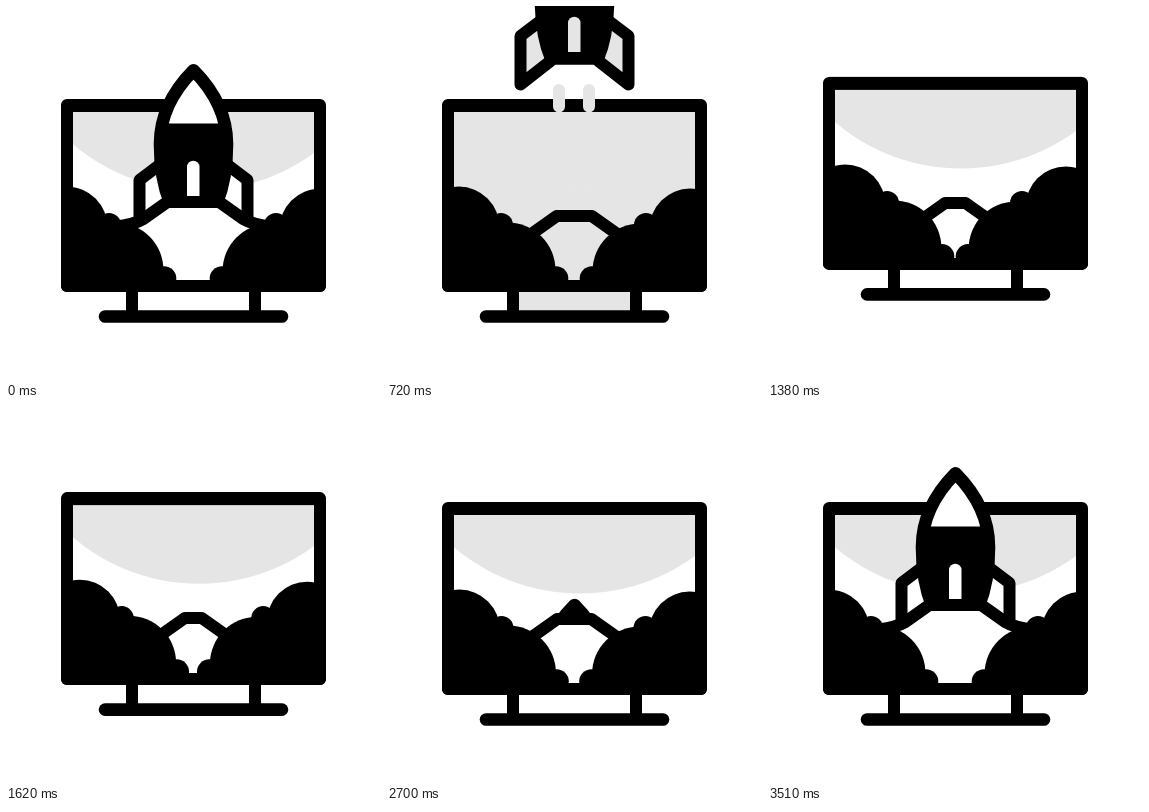
An HTML page that plays this animation: 375x375 px, repeating every 3600 ms.

```html
<!DOCTYPE html>
<html lang="en">
<head>
<meta charset="utf-8">
<title>Rocket launch</title>
<style>
  html, body { margin: 0; width: 100%; height: 100%; overflow: hidden; background: #fff; }
  svg { display: block; width: 100vw; height: 100vh; --paper: #fff; }
  .line { fill: none; stroke: #000; stroke-width: 12; stroke-linejoin: round; stroke-linecap: round; }
  .bold { stroke-width: 12.6; }
  .paper { fill: var(--paper); }
  .puff { fill: none; stroke: var(--paper); stroke-width: 12; stroke-linecap: round; }
</style>
</head>
<body>
<svg viewBox="0 0 375 375">
  <defs>
    <clipPath id="screen"><rect x="66" y="104" width="243" height="172"/></clipPath>
    <clipPath id="floor"><rect x="0" y="-20" width="375" height="297"/></clipPath>
  </defs>
  <g id="scene">
    <rect class="paper" x="126" y="280" width="123" height="30"/>
    <path class="line" d="M126 282V308M249 282V308"/>
    <path class="line bold" d="M99 310.5H276"/>
    <rect class="paper" x="61" y="99" width="253" height="181"/>
    <circle cx="193" cy="-10" r="194.6" fill="#e5e5e5" clip-path="url(#screen)"/>
    <rect class="line" x="61" y="99" width="253" height="181"/>
    <rect x="61" y="93" width="253" height="13"/>
    <path id="curlL" class="puff" d="M173 220V181C172 166 160 162 145 162"/>
    <path id="curlR" class="puff" d="M204 220V181C205 166 217 162 232 162"/>
    <g clip-path="url(#floor)">
      <path id="trail" class="puff" d="M172 149V165.5M202 149V165.5"/>
      <g id="rocket">
        <path class="line paper" d="M152 160L133.5 174V222.5L163.5 199M223 160L241.5 174V222.5L211.5 199"/>
        <path class="line bold paper" d="M187.5 64.3C172 80 154 105 154 138C154 160 158 182 164 196.5H211C217 182 221 160 221 138C221 105 203 80 187.5 64.3Z"/>
        <path d="M157 117.6H218L221 138C221 160 217 182 211 196.5H164C158 182 154 160 154 138Z"/>
        <path class="paper" d="M181 190V161a6.25 6.25 0 0 1 12.5 0V190Z"/>
      </g>
      <path id="hill" class="line paper"/>
    </g>
    <g clip-path="url(#screen)">
      <g id="smokeL">
        <circle cx="61" cy="221" r="40.4"/>
        <circle cx="103" cy="219" r="12"/>
        <circle cx="110" cy="264" r="47.4"/>
        <circle cx="158" cy="272.5" r="12.3"/>
        <path d="M20 221H80L110 240L157 264V285H20Z"/>
      </g>
      <g id="smokeR">
        <circle cx="314" cy="223" r="40.4"/>
        <circle cx="270" cy="219" r="12"/>
        <circle cx="264" cy="265" r="47.4"/>
        <circle cx="216" cy="272.5" r="12.3"/>
        <path d="M355 221H295L264 240L217 265V285H355Z"/>
      </g>
    </g>
    <path class="line" d="M61 280H314"/>
  </g>
</svg>
<script>
const LOOP = 3600, STEP = 30;
const $ = id => document.getElementById(id);
const clamp = (v, a = 0, b = 1) => Math.min(b, Math.max(a, v));
const part = (t, a, b) => clamp((t - a) / (b - a));
const ease = u => (1 - Math.cos(Math.PI * u)) / 2;
const move = (id, x, y) => $(id).setAttribute('transform', `translate(${x} ${y})`);
const show = (id, on) => { $(id).style.display = on ? '' : 'none'; };

// Smooth curve through [time, value] keys, without overshoot.
function track(keys) {
  const n = keys.length;
  const rise = i => (keys[i + 1][1] - keys[i][1]) / (keys[i + 1][0] - keys[i][0]);
  const slope = keys.map((k, i) => {
    if (i === 0 || i === n - 1) return 0;
    const a = rise(i - 1), b = rise(i);
    return a * b <= 0 ? 0 : 2 * a * b / (a + b);
  });
  return t => {
    t = clamp(t, keys[0][0], keys[n - 1][0]);
    let i = 0;
    while (i < n - 2 && t > keys[i + 1][0]) i++;
    const [t0, a] = keys[i], [t1, b] = keys[i + 1];
    const d = t1 - t0, u = (t - t0) / d, v = 1 - u;
    return a * v * v * (1 + 2 * u) + b * u * u * (3 - 2 * u)
      + d * u * v * (slope[i] * v - slope[i + 1] * u);
  };
}

const smoke = track([[120, 0], [480, 5.7], [720, 11], [1230, 16], [1380, 16], [2130, 2.5], [2700, 11.5], [2820, 12], [3510, 0]]);
const hillTop = track([[120, 196], [480, 204.6], [720, 210], [1380, 219], [2040, 218], [2700, 210], [3510, 196]]);
const hillHalf = track([[120, 26], [480, 22], [720, 17.5], [1380, 10], [2040, 6.5], [2700, 17], [3510, 26]]);

const climb = t => 68 * Math.pow(Math.max(0, t - 120) / 360, 1.47);
const arrive = t => 168 * (1 - ease(part(t, 2340, 3510)));

function hillPath(y, w) {
  const c = 187.3, l = c - w, r = c + w;
  return `M${l - 52} 290V${y + 24.5}Q${l - 34} ${y + 23} ${l - 24} ${y + 17}L${l} ${y}H${r}`
    + `L${r + 24} ${y + 17}Q${r + 34} ${y + 23} ${r + 52} ${y + 24.5}V290Z`;
}

function curl(id, t) {
  const el = $(id), len = el.getTotalLength();
  const head = len * part(t, 1800, 2040);
  const tail = 39 * part(t, 1860, 2040) + (len - 39) * part(t, 2040, 2340);
  show(id, head > tail + 0.5);
  el.setAttribute('stroke-dasharray', `0 ${tail} ${Math.max(0, head - tail)} 999`);
}

function draw(ms) {
  const t = Math.min(3510, Math.floor((ms % LOOP) / STEP) * STEP);
  const up = climb(t);
  const leaving = t < 1200;

  const hop = 32 * Math.sin(Math.PI * part(t, 1230, 1710)) ** 2;
  move('scene', 0, -hop);

  show('rocket', leaving || t > 2340);
  move('rocket', 0, leaving ? -up : arrive(t));

  show('trail', leaving && t > 120);
  move('trail', 0, -65 / 76 * (up - 68));

  curl('curlL', t);
  curl('curlR', t);

  $('hill').setAttribute('d', hillPath(hillTop(t), hillHalf(t)));
  move('smokeL', smoke(t), 0);
  move('smokeR', -smoke(t), 0);

  // One-step grey flash as the rocket leaves the screen.
  document.querySelector('svg').style.setProperty('--paper', t === 720 ? '#e5e5e5' : '#fff');
}

// Class order would otherwise let .line clear the fill.
document.querySelectorAll('.line.paper').forEach(el => { el.style.fill = 'var(--paper)'; });

const start = performance.now();
function tick() {
  draw(performance.now() - start);
  requestAnimationFrame(tick);
}
draw(0);
requestAnimationFrame(tick);
</script>
</body>
</html>
```
